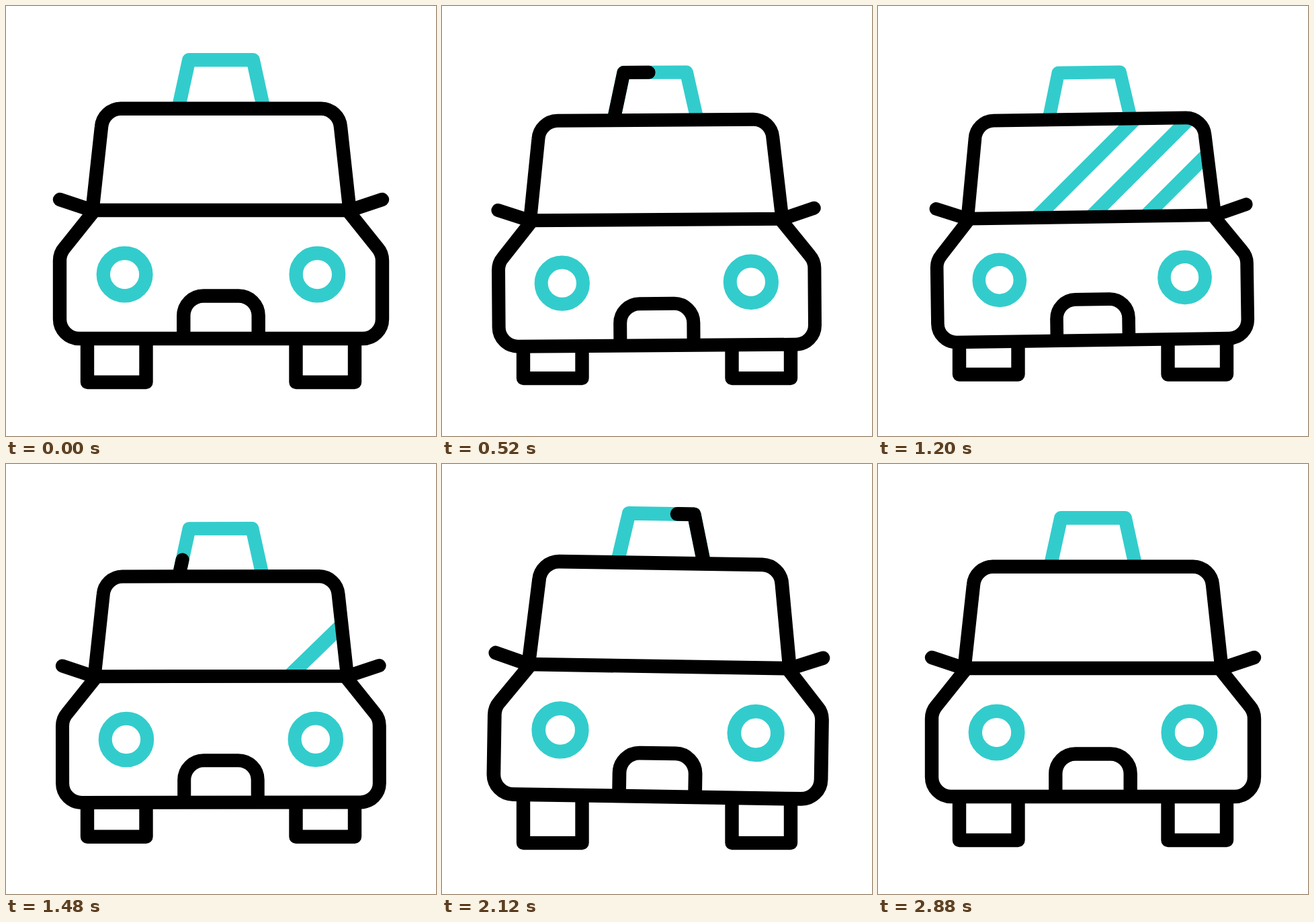
An HTML page that plays this animation: 640 px wide and 640 px high, repeating every 3 s.

```html
<!DOCTYPE html>
<html lang="en">
<head>
<meta charset="utf-8">
<title>Taxi</title>
<style>
  html, body { margin: 0; width: 100%; height: 100%; overflow: hidden; background: #fff; }
  svg { display: block; width: 100vw; height: 100vh; }
  .line { fill: none; stroke: #000; stroke-width: 20.4; stroke-linejoin: round; }
  .teal { stroke: #33cccc; }
  .round { stroke-linecap: round; }
</style>
</head>
<body>
<svg viewBox="0 0 640 640">
  <defs>
    <clipPath id="glass">
      <path d="M128.5 304L142 180A29.5 29.5 0 0 1 171 152.7H469A29.5 29.5 0 0 1 498 180L511.5 304Z"/>
    </clipPath>
  </defs>
  <path id="wheels" class="line"/>
  <g id="car">
    <path class="line teal" d="M256.6 152L272.3 80.3H367.7L383.4 152"/>
    <path id="trace" class="line round" pathLength="100" d="M256.6 152L272.3 80.3H367.7L383.4 152"/>
    <g clip-path="url(#glass)">
      <path id="shine" class="line teal" style="stroke-width:21.5"/>
    </g>
    <path class="line" d="M128.5 304L142 180A29.5 29.5 0 0 1 171 152.7H469A29.5 29.5 0 0 1 498 180L511.5 304Z"/>
    <path class="line round" d="M80 288L128 304M560 288L512 304"/>
    <path class="line" d="M131 305L87 360Q80 368 80 379V466A29 29 0 0 0 109 495H531A29 29 0 0 0 560 466V379Q560 368 553 360L509 305"/>
    <path class="line" d="M264.3 495V461A29.5 29.5 0 0 1 293.8 431.5H346.2A29.5 29.5 0 0 1 375.7 461V495"/>
    <circle class="line teal" cx="176.6" cy="399.6" r="31.8"/>
    <circle class="line teal" cx="463.4" cy="399.6" r="31.8"/>
  </g>
</svg>
<script>
const LOOP = 3000, STEP = 40;
const $ = id => document.getElementById(id);
const wheels = $('wheels'), car = $('car'), trace = $('trace'), shine = $('shine');

// Smooth 0..1 progress between two times
function ease(t, from, to) {
  const k = Math.min(1, Math.max(0, (t - from) / (to - from)));
  return k * k * (3 - 2 * k);
}

// Eased value through [time, value] keys
function track(t, keys) {
  let v = keys[0][1];
  for (let i = 1; i < keys.length; i++) {
    v += (keys[i][1] - keys[i - 1][1]) * ease(t, keys[i - 1][0], keys[i][0]);
  }
  return v;
}

const tilt = [[120, 0], [1040, -1], [1960, 1], [2880, 0]];
const bounce = [[120, 0], [520, 10.2], [1020, 0.5], [1620, 10], [2120, 0]];
// Away from rest, held, then closer
const depth = (t, rest, far, near) =>
  track(t, [[120, rest], [960, far], [1040, far], [2000, near], [2880, rest]]);

const passes = [
  { head: [210, 865], tail: [570, 1200] },
  { head: [1348, 2008], tail: [1765, 2395] }
];

function drawTrace(t) {
  const pass = passes[t < 1280 ? 0 : 1];
  const head = 100 * ease(t, ...pass.head);
  const tail = 100 * ease(t, ...pass.tail);
  const length = head - tail;
  trace.style.display = length > 0.05 ? '' : 'none';
  trace.setAttribute('stroke-dasharray', `${length} 300`);
  trace.setAttribute('stroke-dashoffset', -tail);
}

function drawShine(t) {
  const dt = t - 840;
  let d = '';
  for (let i = 0; i < 3; i++) {
    const x = 225 + 0.709 * dt - i * (78 + 0.018 * dt);
    d += `M${x - 101.5} 328.5L${x + 101.5} 131.5`;
  }
  shine.setAttribute('d', d);
}

function draw(t) {
  const top = 495 + track(t, bounce);
  const angle = track(t, tilt);
  const scale = depth(t, 1, 0.957, 1.016);
  const bottom = depth(t, 560, 547.3, 564.3);
  car.setAttribute('transform',
    `translate(320 ${top}) rotate(${angle}) scale(${scale}) translate(-320 -495)`);
  wheels.setAttribute('d',
    [121, 431.5].map(x => `M${x} ${top}V${bottom}H${x + 87.5}V${top}`).join(''));
  drawTrace(t);
  drawShine(t);
}

const start = performance.now();
function tick() {
  const t = (performance.now() - start) % LOOP;
  draw(Math.floor(t / STEP) * STEP);
  requestAnimationFrame(tick);
}
tick();
</script>
</body>
</html>
```
